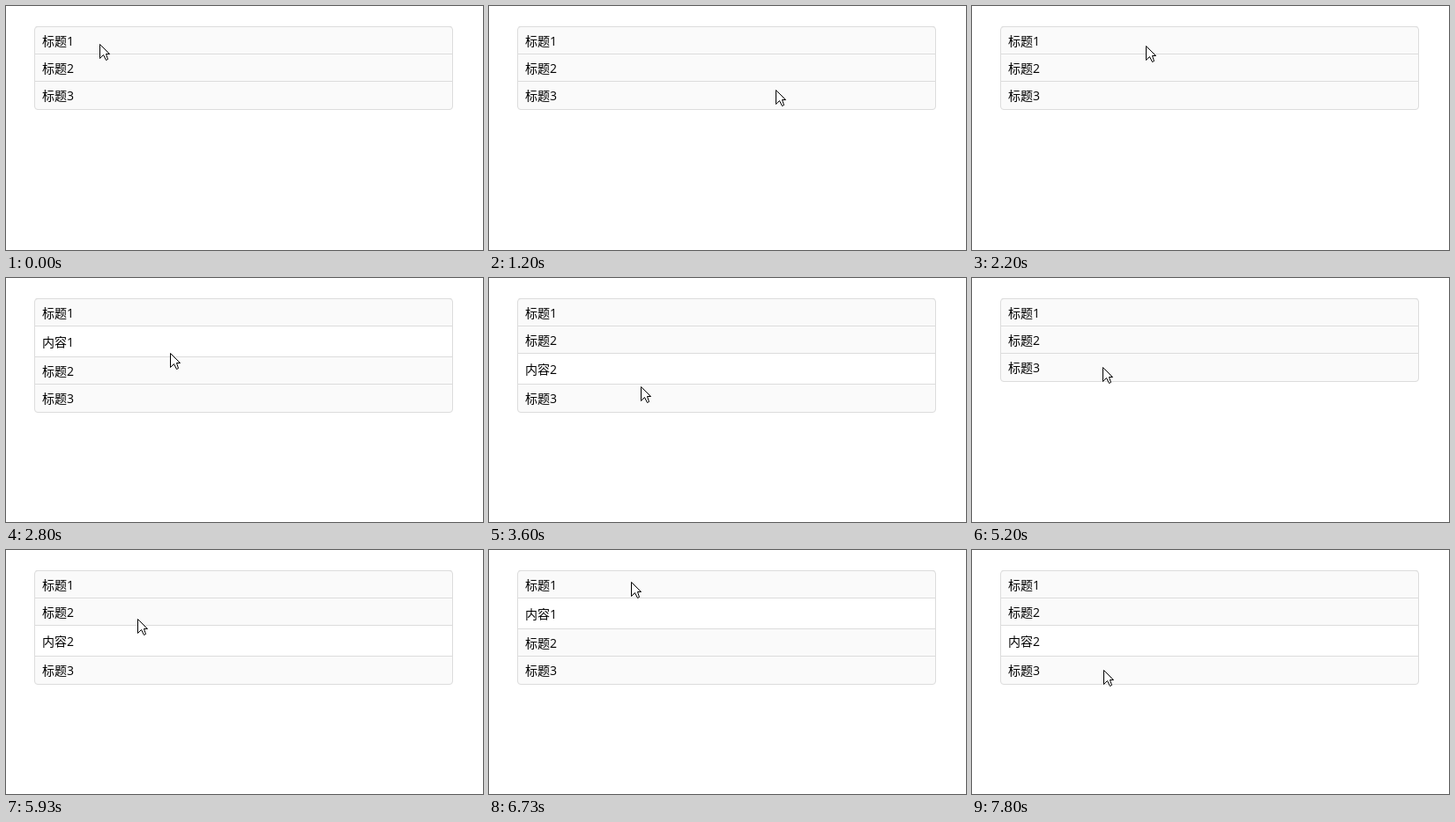
Recreate the animation shown at these times as an HTML page with a canvas. Size 541 by 277 pixels, loop 8 s.

```html
<!DOCTYPE html>
<html lang="zh-CN">
<head>
<meta charset="utf-8">
<title>折叠面板</title>
<style>
html, body { margin: 0; width: 100%; height: 100%; overflow: hidden; background: #fff; }
canvas { display: block; }
</style>
</head>
<body>
<canvas width="541" height="277"></canvas>
<script>
const ctx = document.querySelector('canvas').getContext('2d', { alpha: false });
const LOOP = 8000;
const RATE = 15; // ticks per second; the pointer moves once per tick
const LEFT = 32, TOP = 23, WIDTH = 475;
const TITLE_H = 31, BODY_H = 35;
const LINE = '#dcdcdc', TITLE_BG = '#fafafa';

// A click toggles the title under the pointer.
const clicks = [37, 49, 66, 78, 89, 101, 114];

// Pointer moves; it rests in between.
const home = [106, 43];
const moves = [
  { from: 7, to: 8, end: [116, 38] },
  { from: 12, to: 14, end: [2, 74] },
  { from: 14, to: 18, end: [325, 95] },
  { from: 20, to: 30, end: [197, 47] },
  { from: 32, to: 34, end: [197, 44] },
  { from: 36, to: 45, end: [182, 103] },
  { from: 49, to: 54, end: [172, 123] },
  { from: 54, to: 61, end: [150, 144] },
  { from: 66, to: 70, end: [143, 138] },
  { from: 70, to: 75, end: [148, 101] },
  { from: 81, to: 86, end: [149, 78] },
  { from: 91, to: 98, end: [161, 36] },
  { from: 102, to: 111, end: [150, 107] },
  { from: 114, to: 117, end: [149, 136] }
];

const ease = u => (u + u * u * (3 - 2 * u)) / 2;

function pointerAt(tick) {
  let pos = home;
  for (const { from, to, end } of moves) {
    if (tick <= from) break;
    const u = ease(Math.min(1, (tick - from) / (to - from)));
    pos = pos.map((p, i) => Math.floor(p + (end[i] - p) * u));
  }
  return pos;
}

const titleTop = (n, open) =>
  TOP + (n - 1) * TITLE_H + (open && open < n ? BODY_H : 0);

function openAt(tick) {
  let open = 0;
  for (const click of clicks) {
    if (click > tick) break;
    const y = pointerAt(click - 1)[1];
    const hit = [3, 2, 1].find(n => y >= titleTop(n, open));
    open = hit === open ? 0 : hit;
  }
  return open;
}

function rect(color, x, y, w, h) {
  ctx.fillStyle = color;
  ctx.fillRect(x, y, w, h);
}

function row(text, y, height, bg, inset) {
  rect(bg, LEFT, y, WIDTH, height);
  rect(LINE, LEFT, y, WIDTH, 1);
  ctx.fillStyle = '#000';
  ctx.fillText(text, 41, y + inset);
}

function drawPanels(open) {
  const height = 3 * TITLE_H + 2 + (open ? BODY_H : 0);
  ctx.save();
  ctx.beginPath();
  ctx.roundRect(LEFT, TOP, WIDTH, height, 4);
  ctx.clip();
  for (let n = 1; n <= 3; n++) {
    const y = titleTop(n, open);
    row('标题' + n, y, TITLE_H + 2, TITLE_BG, 22);
    if (n === open) row('内容' + n, y + TITLE_H, BODY_H + 1, '#fff', 24);
  }
  ctx.restore();
  ctx.strokeStyle = LINE;
  ctx.beginPath();
  ctx.roundRect(LEFT + 0.5, TOP + 0.5, WIDTH - 1, height - 1, 3.5);
  ctx.stroke();
}

function drawPointer(x, y) {
  const arrow = [[0, 0], [0, 16], [4, 12], [7, 18], [9, 17], [7, 11], [11, 11]];
  ctx.beginPath();
  for (const [dx, dy] of arrow) ctx.lineTo(x + dx + 0.5, y + dy + 0.5);
  ctx.closePath();
  ctx.fillStyle = '#fff';
  ctx.fill();
  ctx.strokeStyle = '#000';
  ctx.stroke();
}

function draw(t) {
  const tick = Math.floor(t * RATE / 1000 + 0.1);
  rect('#fff', 0, 0, 541, 277);
  ctx.lineWidth = 1;
  ctx.lineJoin = 'round';
  ctx.font = '14px "Open Sans", "Noto Sans CJK SC", "Noto Sans CJK", sans-serif';
  drawPanels(openAt(tick));
  drawPointer(...pointerAt(tick));
}

const start = performance.now();
function loop() {
  draw((performance.now() - start) % LOOP);
  requestAnimationFrame(loop);
}
loop();
</script>
</body>
</html>
```
